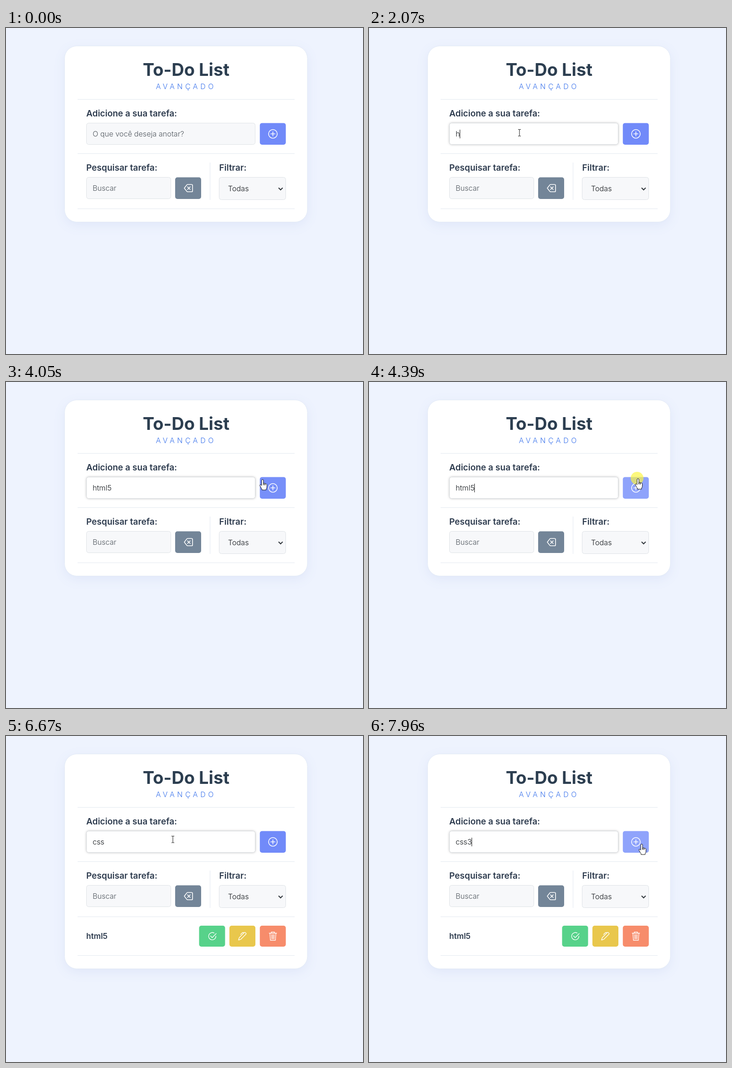
Animation of 783x715 px, one loop 8 s. Source, as an HTML page:

```html
<!DOCTYPE html>
<html lang="pt-BR">
<head>
<meta charset="utf-8">
<title>To-Do List</title>
<style>
html, body { margin: 0; width: 100%; height: 100%; overflow: hidden; background: #eef3fe; }
svg { display: block; font-family: Inter, sans-serif; }
.shadow { filter: drop-shadow(0 7px 12px rgba(60, 80, 190, .07)); }
.card { fill: #fff; stroke: #e2eaf5; }
.line { fill: none; stroke: #e2e8f0; }
.title { font-size: 38px; font-weight: 700; fill: #2c3e50; }
.sub { font-size: 16px; font-weight: 300; letter-spacing: 5.5px; fill: #3f76ec; }
.label { font-size: 19px; font-weight: 600; fill: #2d3b4e; }
.item { font-size: 17.1px; font-weight: 600; fill: #2d3b4e; }
.text { font-size: 16.15px; font-weight: 300; fill: #15191d; }
.hint { fill: #51585f; }
rect { rx: 5px; }
.field { height: 47px; fill: #f7f8fa; stroke: #dee2e6; }
.focus { fill: #fff; stroke: #d5d8dc; filter: drop-shadow(0 0 2.5px rgba(0, 0, 0, .22)); }
.btn { width: 57px; height: 47.5px; }
#item .btn { height: 46px; }
.icon { fill: none; stroke: #fff; stroke-width: 1.6; stroke-linecap: round; stroke-linejoin: round; }
#item .icon { stroke-width: 1.35; }
#cursor { stroke: #111; stroke-linejoin: round; fill: #fff; }
</style>
</head>
<body>
<svg width="783" height="715" viewBox="0 0 783 715">
  <g class="shadow"><rect id="card" class="card" x="128.5" y="39.5" width="532.5" height="386" style="rx: 27px"/></g>

  <text class="title" x="395" y="105" text-anchor="middle">To-Do List</text>
  <text class="sub" x="328.7" y="134">AVANÇADO</text>
  <path class="line" d="M157 156.5H633M157 275.5H633M157 396.5H633M447.5 295V377"/>

  <text class="label" x="176" y="194">Adicione a sua tarefa:</text>
  <rect id="field" class="field" x="176.5" y="208.5" width="370"/>
  <text id="hint" class="text hint" x="190" y="238">O que você deseja anotar?</text>
  <text id="typed" class="text" x="190" y="238"></text>
  <rect id="caret" y="223" width="1" height="19" fill="#111" style="rx: 0"/>
  <rect id="add" class="btn" x="556.7" y="208.4"/>
  <g class="icon" transform="translate(585.4 232.2)"><circle r="9.5"/><path d="M-4.5 0h9M0-4.5v9"/></g>

  <text class="label" x="176" y="313">Pesquisar tarefa:</text>
  <rect class="field" x="176.5" y="327.5" width="185"/>
  <text class="text hint" x="190" y="357">Buscar</text>
  <rect class="btn" x="371" y="327.5" fill="#738598"/>
  <path class="icon" transform="translate(400 351.3)" d="M-9 0l5.5-7q.8-1 2-1H7q2.2 0 2.2 2.2V5.9Q9.2 8 7 8h-8.5q-1.2 0-2-1zM-1.8-2.9L4 2.9M4-2.9L-1.8 2.9"/>

  <text class="label" x="467.5" y="313">Filtrar:</text>
  <rect class="field" x="467.5" y="327.5" width="146" style="height: 49px"/>
  <text class="text" x="487" y="358">Todas</text>
  <path d="M597.8 350.5l4.5 4.5 4.5-4.5" fill="none" stroke="#2f353b" stroke-width="2"/>

  <g id="item">
    <text class="item" x="176" y="445">html5</text>
    <path class="line" d="M157 481.5H633"/>
    <g transform="translate(423.5 416)">
      <rect class="btn" fill="#57d28a"/>
      <path class="icon" d="M33 16.2A8 8 0 1 0 36.9 23M25.1 22.6l3.6 3.6 8.8-9"/>
    </g>
    <g transform="translate(490 416)">
      <rect class="btn" fill="#e9c74c"/>
      <path class="icon" d="M20 31.5l1.6-5.3 11-11q1.2-1.2 2.4 0l1.2 1.2q1.2 1.2 0 2.4l-11 11zM32.6 15.2h-4l-4 4"/>
    </g>
    <g transform="translate(556.7 416)">
      <rect class="btn" fill="#f78c6b"/>
      <path class="icon" d="M20.5 16.5H37M25.2 16.3v-2.4h7v2.4M22.2 16.8l1 15.2h11l1-15.2M25.9 19.5l.4 9.5M28.7 19.5v9.5M31.5 19.5l-.4 9.5"/>
    </g>
  </g>

  <circle id="press" r="14" fill="#fbf43f" opacity=".68"/>
  <g id="cursor">
    <path id="beam" fill="none" d="M-3-7.5H-.8L0-6.8 .8-7.5H3M0-7V6.5M-3 7H-.8L0 6.3 .8 7H3"/>
    <path id="hand" d="M-2 13.3V2a2 2 0 0 1 4 0v10.3V8.5q2-1.2 3.2.6v3.4V9.1q1.8-.9 2.8.8 1.5-.2 1.5 1.8V16q0 3-1.8 5v2h-9v-2q-1.5-1.5-2.5-4l-2-3.5q-.8-1.8.8-2.2 1.3-.2 3 2z"/>
    <path id="arrow" d="M0 0V16.5L3.9 13 6.5 18.8 9 17.7 6.5 12H11.8Z"/>
  </g>
</svg>
<script>
const LOOP = 8000, FRAME = 1000 / 15, BLINK = 530;
const FOCUS = 1070, SUBMIT = 4400;
const el = {};
document.querySelectorAll('[id]').forEach(n => el[n.id] = n);

const words = [
  { text: 'html5', keys: [2070, 2270, 2400, 2600, 3330] },
  { text: 'css3', keys: [5610, 5940, 6130, 6800] }
];
const caretResets = [FOCUS, SUBMIT, ...words.flatMap(w => w.keys)];

// Each move glides from the previous point to x, y.
const moves = [
  { from: 250, to: 990, x: 311, y: 230 },
  { from: 1840, to: 1850, x: 330, y: 230 },
  { from: 3790, to: 4120, x: 590, y: 212 },
  { from: 4540, to: 4940, x: 366, y: 227 },
  { from: 7215, to: 7900, x: 598, y: 237 }
];

const ramp = (t, from, to) => Math.min(1, Math.max(0, (t - from) / (to - from)));
const ease = p => (1 - Math.cos(Math.PI * p)) / 2;
const show = (node, on) => node.style.display = on ? '' : 'none';

function pointer(t) {
  let x = 517, y = 520;
  for (const m of moves) {
    const p = ease(ramp(t, m.from, m.to));
    x += (m.x - x) * p;
    y += (m.y - y) * p;
  }
  return [x, y];
}

function cursorKind(x, y) {
  const over = (l, r, top) => x >= l && x <= r && y >= top && y <= top + 48;
  if (over(556, 614, 208) || over(371, 428, 327)) return 'hand';
  return over(176, 547, 208) || over(176, 362, 327) ? 'beam' : 'arrow';
}

function render(t) {
  const word = words[t < SUBMIT ? 0 : 1];
  const text = word.text.slice(0, word.keys.filter(k => k <= t).length);
  el.typed.textContent = text;
  show(el.hint, !text);
  el.field.classList.toggle('focus', t >= FOCUS);

  const reset = Math.max(...caretResets.filter(k => k <= t));
  show(el.caret, t >= FOCUS && Math.floor((t - reset) / BLINK) % 2 === 0);
  el.caret.setAttribute('x', Math.round(190 + el.typed.getComputedTextLength() - .5));

  const added = t >= SUBMIT;
  show(el.item, added);
  el.card.setAttribute('height', added ? 471 : 386);

  const hover = ramp(t, 4010, 4210) - ramp(t, 4600, 4800) + ramp(t, 7710, 7910);
  const tint = [[113, 143], [138, 163], [249, 251]].map(([a, b]) => a + (b - a) * hover);
  el.add.setAttribute('fill', `rgb(${tint})`);

  const [x, y] = pointer(Math.floor((t + 17) / FRAME) * FRAME - 16);
  const kind = cursorKind(x, y);
  for (const name of ['beam', 'hand', 'arrow']) show(el[name], name === kind);
  show(el.cursor, t >= 250);
  el.cursor.setAttribute('transform', `translate(${x} ${y})`);

  show(el.press, [FOCUS, SUBMIT - 60].some(at => t >= at && t < at + 60));
  el.press.setAttribute('cx', x - 2);
  el.press.setAttribute('cy', y - 1);
}

const start = performance.now();
function loop() {
  render((performance.now() - start) % LOOP);
  requestAnimationFrame(loop);
}
loop();
</script>
</body>
</html>
```
